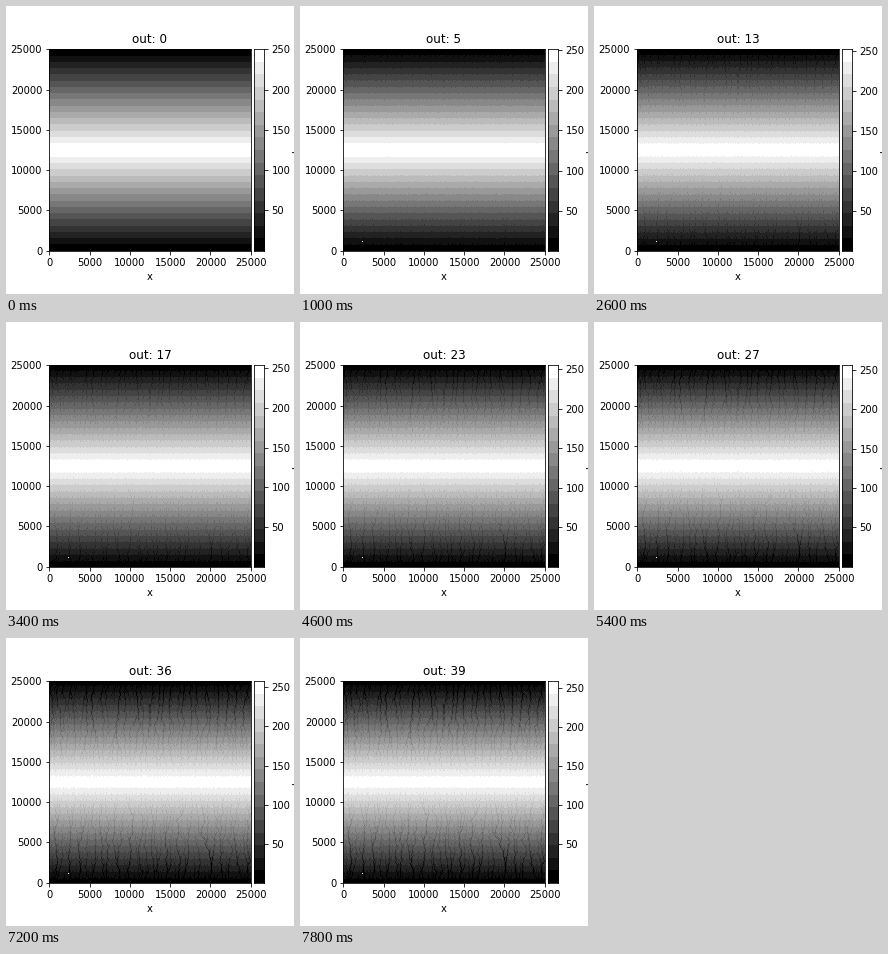
Recreate the animation shown at these times as a matplotlib script. Size 288 px wide and 288 px high, loop 8 s.

```python
import numpy as np
import matplotlib.pyplot as plt
from matplotlib.animation import FuncAnimation

SIZE, DPI = 288, 72
STEPS, INTERVAL = 40, 200
LENGTH = 25000
HALF, WIDTH = 100, 201          # rows from edge to ridge, columns
PEAK, UPLIFT, ERODE = 250, 0.22, 0.012

plt.rcParams.update({"font.family": "DejaVu Sans", "font.size": 10})
rng = np.random.default_rng(7)
cols = np.arange(WIDTH)
sides = np.arange(2)[:, None]
weights = np.array([1 / 1.1, 1, 1 / 1.1])[:, None, None]


def erode(z):
    """Route water row by row from the ridge to both edges and cut channels."""
    area = np.ones_like(z)
    out = z + UPLIFT
    for r in range(HALF, 0, -1):
        low = z[r - 1]
        below = np.stack([np.roll(low, 1, -1), low, np.roll(low, -1, -1)])
        drop = (z[r] - below) * weights
        to = (cols + drop.argmax(0) - 1) % WIDTH
        np.add.at(area[r - 1], (sides, to), area[r])
        out[r] -= ERODE * np.sqrt(area[r]) * np.maximum(drop.max(0), 0)
    out[0] = 0
    return out


def top(step):
    return PEAK + UPLIFT * step


def whole(z, step):
    """Join the two slopes at the ridge."""
    field = np.vstack([z[:, 0], z[-2::-1, 1]])
    if step:
        field[9, 19] = top(step)
    return field


def simulate():
    z = np.linspace(0, PEAK, HALF + 1)[:, None, None]
    z = z + rng.uniform(0, 0.5, (HALF + 1, 2, WIDTH))
    z[0] = 0
    fields = []
    for step in range(STEPS):
        fields.append(whole(z, step))
        z = erode(z)
    return fields


fields = simulate()
gray = plt.get_cmap("gray", 16)

fig = plt.figure(figsize=(SIZE / DPI, SIZE / DPI), dpi=DPI, facecolor="white")
ax = fig.add_axes([0.15, 0.15, 0.7, 0.7])
ticks = range(0, LENGTH + 1, 5000)
image = ax.imshow(fields[0], cmap=gray, vmin=0, vmax=PEAK, origin="lower",
                  extent=[0, LENGTH, 0, LENGTH], aspect="auto",
                  interpolation="nearest")
ax.set_xticks(ticks)
ax.set_yticks(ticks)
ax.set_xlabel("x")
title = ax.set_title("out: 0", fontsize=12)

bar = fig.add_axes([0.8625, 0.15, 0.035, 0.7])
ramp = bar.imshow(np.arange(16)[:, None], cmap=gray, origin="lower",
                  extent=[0, 1, 0, PEAK], aspect="auto",
                  interpolation="nearest")
bar.set_xticks([])
bar.yaxis.tick_right()
bar.set_yticks(range(50, 251, 50))
fig.text(286 / SIZE, 0.5, "h", rotation=90, ha="left", va="center")


def draw(step):
    high = top(step)
    image.set_data(fields[step])
    image.set_clim(0, high)
    ramp.set_extent([0, 1, 0, high])
    bar.set_ylim(0, high)
    title.set_text(f"out: {step}")
    return image, ramp, title


anim = FuncAnimation(fig, draw, frames=STEPS, interval=INTERVAL,
                     init_func=lambda: draw(0), repeat=True, repeat_delay=0)
plt.show()
```
